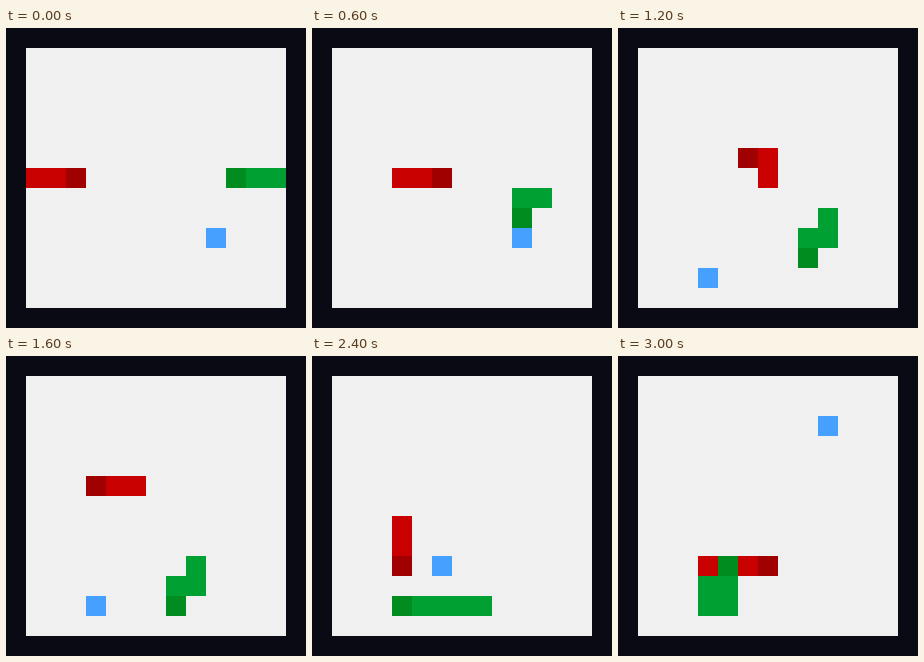
An HTML page with a canvas for the animation above (4 s loop, 300 by 300 pixels).

```html
<!DOCTYPE html>
<html lang="en">
<head>
<meta charset="utf-8">
<title>Two snakes</title>
<style>
html, body { margin: 0; width: 100%; height: 100%; overflow: hidden; background: #0a0a14; }
canvas { display: block; width: 300px; height: 300px; }
</style>
</head>
<body>
<canvas id="stage" width="300" height="300"></canvas>
<script>
const CELL = 20, STEP = 200, LOOP = 4000, LAST = 15;
const ctx = document.getElementById('stage').getContext('2d');

const MOVES = { R: [1, 0], L: [-1, 0], U: [0, -1], D: [0, 1] };

// Each snake: starting tail, head moves (the first two build the body), steps at which it eats.
const snakes = [
  { tail: [1, 7], moves: 'RR' + 'RRRRULLLDDDDRRR', eats: [14], body: '#c80000', head: '#a00000' },
  { tail: [13, 7], moves: 'LL' + 'DLDDLDLDLLLLURU', eats: [4, 12], body: '#00a032', head: '#008c1e' }
];

const foods = [
  { from: 0, at: [10, 10] },
  { from: 4, at: [4, 12] },
  { from: 12, at: [6, 10] },
  { from: 14, at: [10, 3] }
];

for (const s of snakes) {
  s.path = [s.tail];
  for (const m of s.moves) {
    const [x, y] = s.path[s.path.length - 1];
    s.path.push([x + MOVES[m][0], y + MOVES[m][1]]);
  }
}

function cell([x, y], color) {
  ctx.fillStyle = color;
  ctx.fillRect(x * CELL, y * CELL, CELL, CELL);
}

function drawSnake(s, step) {
  const length = 3 + s.eats.filter(e => e <= step).length;
  const end = step + 3;
  const parts = s.path.slice(end - length, end);
  parts.forEach(p => cell(p, s.body));
  cell(parts[length - 1], s.head);
}

function draw(step) {
  ctx.fillStyle = '#0a0a14';
  ctx.fillRect(0, 0, 300, 300);
  ctx.fillStyle = '#f0f0f0';
  ctx.fillRect(CELL, CELL, 260, 260);
  cell(foods.filter(f => f.from <= step).pop().at, '#46a0ff');
  snakes.forEach(s => drawSnake(s, step));
}

function tick() {
  const t = performance.now() % LOOP;
  draw(Math.min(LAST, Math.floor(t / STEP)));
  requestAnimationFrame(tick);
}
tick();
</script>
</body>
</html>
```
